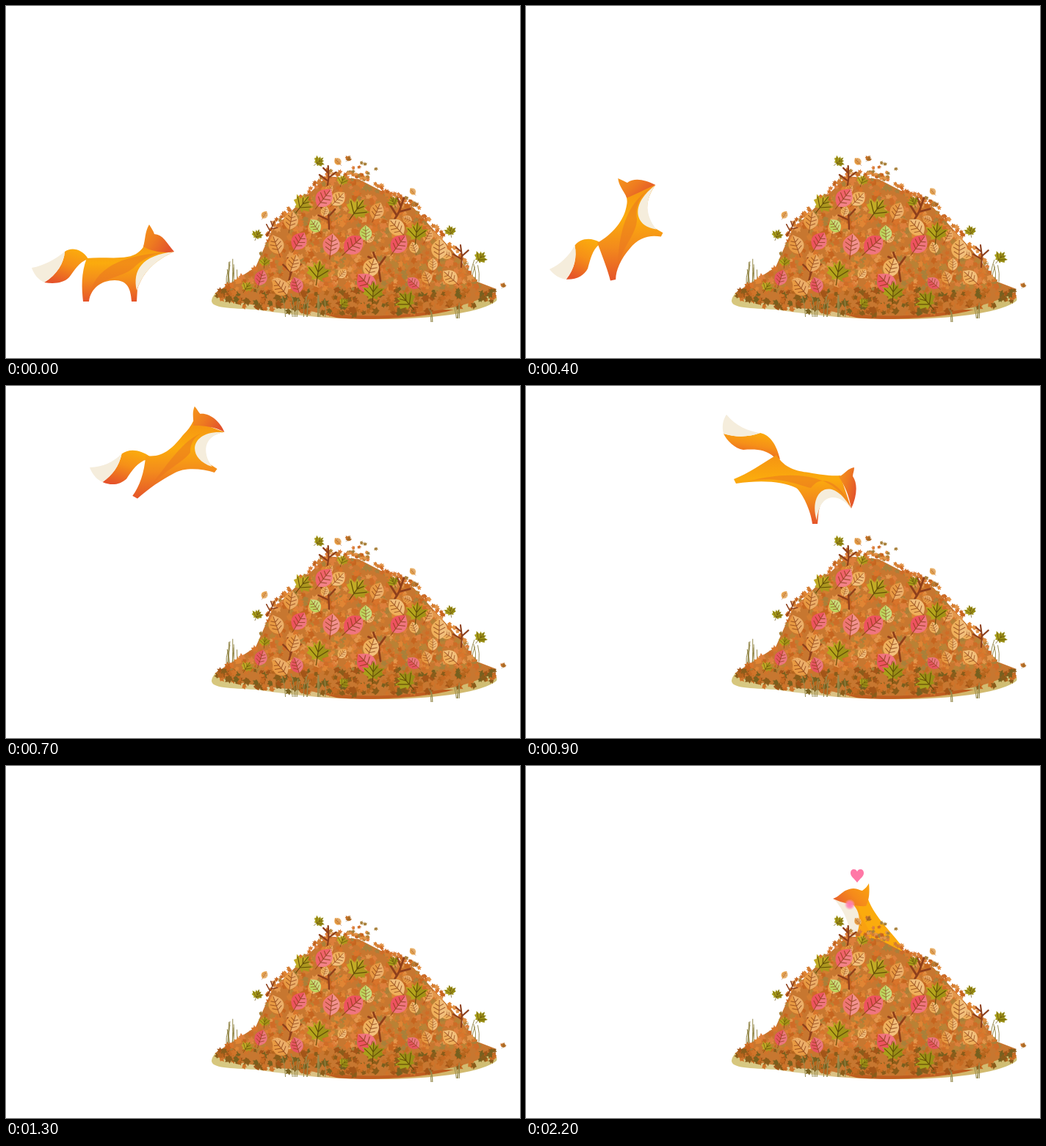
An HTML page that plays this animation: 700 by 480 pixels, repeating every 2800 ms.

```html
<!DOCTYPE html>
<html lang="en">
<head>
<meta charset="utf-8">
<title>Fox and leaf pile</title>
<style>
html, body { margin: 0; width: 100%; height: 100%; overflow: hidden; background: #fff; }
svg { display: block; width: 700px; height: 480px; }
</style>
</head>
<body>
<svg viewBox="0 0 700 480">
  <defs>
    <linearGradient id="coat" x1="0" y1="0" x2="0" y2="1">
      <stop offset="0" stop-color="#f59313"/><stop offset=".35" stop-color="#fbab0d"/>
      <stop offset=".65" stop-color="#f38b1c"/><stop offset="1" stop-color="#e5542a"/>
    </linearGradient>
    <linearGradient id="brush" x1=".7" y1="0" x2=".3" y2="1">
      <stop offset="0" stop-color="#fbab0d"/><stop offset=".45" stop-color="#f69018"/><stop offset="1" stop-color="#e5532a"/>
    </linearGradient>
    <linearGradient id="face" x1="0" y1="0" x2="1" y2=".6">
      <stop offset="0" stop-color="#f6961a"/><stop offset=".5" stop-color="#ee7b20"/><stop offset="1" stop-color="#e3542c"/>
    </linearGradient>
    <linearGradient id="peekFace" x1="1" y1="0" x2="0" y2=".6">
      <stop offset="0" stop-color="#fba50d"/><stop offset=".55" stop-color="#f58a1b"/><stop offset="1" stop-color="#e9652b"/>
    </linearGradient>
    <radialGradient id="blush">
      <stop offset="0" stop-color="#ff78b0"/><stop offset=".55" stop-color="#ff86b4" stop-opacity=".85"/>
      <stop offset="1" stop-color="#ff9cc0" stop-opacity="0"/>
    </radialGradient>
    <linearGradient id="soil">
      <stop offset="0" stop-color="#d6c67c"/><stop offset=".25" stop-color="#ddd09a"/>
      <stop offset=".55" stop-color="#d9a85c"/><stop offset="1" stop-color="#cfc076"/>
    </linearGradient>
    <path id="halfMaple" d="M0-1 .2-.55 .46-.72 .42-.32 .98-.38 .74-.04 .88.2 .4.42 .42.66 0 .5Z"/>
    <g id="maple">
      <use href="#halfMaple" transform="scale(-1 1)"/>
      <use href="#halfMaple"/><use href="#halfMaple" style="fill:#5c4a00;fill-opacity:.2"/>
      <path d="M0-.85V1.05M-.78-.26 0 .42 .78-.26M-.33-.5 0 0 .33-.5" style="fill:none" stroke="#644d08" stroke-width=".07"/>
    </g>
    <g id="oval">
      <path d="M0-1.05C.35-.75.8-.5.76.05 .72.55.3.8 0 .95-.3.8-.72.55-.76.05-.8-.5-.35-.75 0-1.05Z"/>
      <path d="M0-1.05C.35-.75.8-.5.76.05 .72.55.3.8 0 .95Z" style="fill:#fff;fill-opacity:.2"/>
      <path d="M0-.9V1.3M-.4-.55 0-.3 .4-.55M-.57-.22 0 .1 .57-.22M-.5.2 0 .5 .5.2" style="fill:none" stroke="#8a3c14" stroke-opacity=".75" stroke-width=".075"/>
    </g>
    <path id="scrap" d="M0-1 .25-.4 .9-.5 .6.1 .7.5 0 .6-.7.5-.6.1-.9-.5-.25-.4Z"/>
    <path id="twig" d="M0 0 .05-.5 0-1M.04-.35-.35-.6M.05-.5 .35-.75M.02-.7-.2-.9" style="fill:none" stroke="#8e3f1b" stroke-width=".07" stroke-linecap="round"/>
  </defs>
  <g id="fox">
    <path id="tail" fill="url(#brush)"/>
    <path id="tip" fill="#f5eddc"/>
    <path id="body" fill="url(#coat)"/>
    <path id="shade" fill="#ea7420" fill-opacity=".5"/>
    <path id="chest" fill="#f5eddc"/>
    <path id="head" fill="url(#face)"/>
  </g>
  <g id="peek">
    <path fill="#fbab0d" d="M424 184C438 198 445 220 447 265H512V246C498 226 476 208 466 182Z"/>
    <path fill="#f59417" fill-opacity=".45" d="M452 190C456 210 472 225 480 258H455C452 225 448 206 440 190Z"/>
    <path fill="#f5eddc" d="M420 182C432 196 440 212 444 240C456 226 460 196 440 185Z"/>
    <path fill="url(#peekFace)" d="M418 181C428 178 431 168 446 167 452 167 455 170 458 170 462 167 465 164 467 160 468 170 468 182 463 191 450 192 432 187 418 181Z"/>
    <circle id="cheek" cx="441" cy="189" r="7.5" fill="url(#blush)"/>
  </g>
  <g id="pile"></g>
  <g id="flying"></g>
  <path id="heart" fill="#ff78a6" d="M451 159C447 153 442 151 442 146 442 140 449 139 451 144 453 139 460 140 460 146 460 151 455 153 451 159Z"/>
</svg>
<script>
(() => {
const $ = id => document.getElementById(id);
const lerp = (a, b, t) => a + (b - a) * t;

// Standing, leaping and diving fox. All share one path structure, so they blend point by point.
const poses = [
  { at: [150, 360], angle: 0,
    tail: 'M112,345C103,330 88,329 80,335C79,350 70,366 52,377C66,379 78,378 86,370C94,360 98,350 112,345Z',
    tip: 'M80,335C66,346 52,354 35,357C38,366 44,373 52,377C70,366 79,350 80,335Z',
    body: 'M110,344C135,341 165,348 180,336C188,330 188,326 189,322L229,335C203,347 187,362 179,386L178,403L171,403C170,385 165,374 148,374C130,374 115,385 113,403L105,403C103,385 102,364 110,344Z',
    shade: 'M215,336C170,340 125,350 114,392C130,368 160,372 177,354C187,345 200,338 215,336Z',
    chest: 'M229,335C203,347 187,362 178,388C172,360 185,340 229,335Z',
    head: 'M187,328C190,318 189,308 195,298C198,303 201,307 202,311C214,312 218,322 229,335C218,337 200,336 187,328Z' },
  { at: [147, 162], angle: -30,
    tail: 'M133,165C120,161 106,164 99,175C103,192 101,206 92,220C108,222 116,214 120,205C122,192 124,178 132,170Z',
    tip: 'M99,175C93,190 82,202 68,208C75,215 83,220 92,220C101,206 103,192 99,175Z',
    body: 'M128,165C152,160 160,138 165,116C167,108 165,105 164,98L208,95C190,110 190,130 208,145L220,146L219,152C200,156 180,165 167,183C155,198 145,210 136,220L128,218C134,205 136,190 128,165Z',
    shade: 'M204,96C166,105 168,160 148,202C165,170 178,160 181,140C175,120 185,103 204,96Z',
    chest: 'M207,96C191,108 191,130 211,146C172,150 169,112 207,96Z',
    head: 'M166,106C165,100 157,92 157,80C162,83 165,86 168,87C178,80 196,83 208,95C193,94 178,100 166,106Z' },
  { at: [365, 120], angle: 30,
    tail: 'M346,100C341,80 333,67 319,64C303,70 285,70 269,65C274,75 284,85 296,87C312,86 326,86 338,97Z',
    tip: 'M319,64C303,62 285,54 273,39C267,48 267,57 269,65C285,70 303,70 319,64Z',
    body: 'M341,94C352,112 368,116 385,118C402,121 415,123 428,122L443,167C428,145 400,140 398,178L397,188L390,188C388,170 376,145 368,139C350,130 320,128 286,133L283,127C303,119 322,106 341,94Z',
    shade: 'M440,160C415,118 360,115 302,130C345,122 370,135 388,139C402,120 425,130 440,160Z',
    chest: 'M443,167C428,147 400,142 396,183C384,145 415,118 443,167Z',
    head: 'M426,124C434,120 438,112 447,111C447,116 445,119 445,123C452,133 451,150 443,167C440,150 434,135 426,124Z' }
];
const parts = ['tail', 'tip', 'body', 'shade', 'chest', 'head'];
const pair = /(-?[\d.]+),(-?[\d.]+)/g;

// Times are in steps of 100 ms; pose is an index into poses, possibly between two.
const keys = [
  { step: 0, x: 150, y: 360, angle: 0, pose: 0, wag: 0 },
  { step: 1, x: 145, y: 362, angle: 0, pose: 0, wag: 0 },
  { step: 4, x: 126, y: 315, angle: -37, pose: .55, wag: 15 },
  { step: 6, x: 147, y: 162, angle: -30, pose: 1, wag: 0 },
  { step: 7, x: 215, y: 98, angle: -12, pose: 1.35, wag: 0 },
  { step: 9, x: 365, y: 120, angle: 30, pose: 2, wag: 0 },
  { step: 12, x: 450, y: 315, angle: 65, pose: 2, wag: 0 }
];

function turn([x, y], degrees) {
  const a = degrees * Math.PI / 180, c = Math.cos(a), s = Math.sin(a);
  return [x * c - y * s, x * s + y * c];
}

const localPoints = (pose, part) => [...pose[part].matchAll(pair)].map(
  ([, x, y]) => turn([x - pose.at[0], y - pose.at[1]], -pose.angle));

function stateAt(step) {
  const i = Math.max(1, keys.findIndex(k => k.step >= step));
  const a = keys[i - 1], b = keys[i], t = (step - a.step) / (b.step - a.step);
  return Object.fromEntries(Object.keys(a).map(name => [name, lerp(a[name], b[name], t)]));
}

function drawFox({ x, y, angle, pose, wag }) {
  const from = Math.min(1, Math.floor(pose)), blend = pose - from;
  const blended = part => {
    const b = localPoints(poses[from + 1], part);
    return localPoints(poses[from], part).map((p, i) => p.map((v, k) => lerp(v, b[i][k], blend)));
  };
  const root = blended('tail')[0];
  for (const part of parts) {
    const bend = part === 'tail' || part === 'tip' ? wag : 0;
    const points = blended(part).map(p => {
      const [dx, dy] = turn([p[0] - root[0], p[1] - root[1]], bend);
      const [px, py] = turn([root[0] + dx, root[1] + dy], angle);
      return `${(x + px).toFixed(1)},${(y + py).toFixed(1)}`;
    });
    $(part).setAttribute('d', poses[0][part].replace(pair, () => points.shift()));
  }
}

// Seeded random numbers keep the pile the same on every load.
let seed = 71;
function random(low = 0, high = 1) {
  seed = (seed + 0x6D2B79F5) | 0;
  let t = Math.imul(seed ^ seed >>> 15, 1 | seed);
  t ^= t + Math.imul(t ^ t >>> 7, 61 | t);
  return lerp(low, high, ((t ^ t >>> 14) >>> 0) / 4294967296);
}
const pick = list => list[Math.floor(random(0, list.length))];
const leaf = (kind, x, y, size, angle, fill) =>
  `<use href="#${kind}" transform="translate(${x.toFixed(1)} ${y.toFixed(1)}) rotate(${angle.toFixed()}) scale(${size.toFixed(1)})" fill="${fill}"/>`;
const repeat = (count, draw) => Array.from({ length: count }, draw).join('');

const ridge = [[284, 392], [340, 356], [362, 306], [437, 232], [480, 236], [555, 275], [605, 330], [642, 376], [668, 386]];
function ridgeY(x) {
  const i = Math.max(1, ridge.findIndex(p => p[0] >= x));
  const [x0, y0] = ridge[i - 1], [x1, y1] = ridge[i];
  return lerp(y0, y1, (x - x0) / (x1 - x0));
}
const baseY = x => 396 + 24 * Math.sqrt(Math.max(0, 1 - ((x - 475) / 194) ** 2));

const warm = ['#d9752b', '#e08534', '#cf6c27', '#e3964b', '#d47d30', '#c6651f', '#dd7f3c', '#b98235', '#a8803a'];
const earthy = ['#b5651d', '#8a5c1a', '#c66a22', '#77601f', '#d0742a', '#a35518'];
const amber = ['#eca44b', '#e89a43', '#efb05b'];
const rose = ['#f0626a', '#ed5360', '#ef7774'];
const olive = ['#b5a51b', '#a99f1b', '#c1ab25'];

function scrap() {
  const x = random(288, 666), y = random(222, 420);
  if (y < ridgeY(x) || y > baseY(x)) return '';
  return leaf('scrap', x, y, random(3.5, 6.7), random(0, 360), pick(y > 386 ? earthy : warm));
}

function fringe() {
  const x = random(345, 630);
  return leaf('scrap', x, ridgeY(x) - random(2, 9), 3.7, random(0, 360), pick(warm));
}

function amberLeaf() {
  const x = random(360, 600);
  return leaf('oval', x, lerp(ridgeY(x), 400, random(.1, 1)), random(7, 10), random(-70, 70), pick(amber));
}

const bunch = (kind, size, fills, points) => points.map(([x, y]) =>
  leaf(kind, x, y, size * random(.9, 1.1), random(-50, 50), pick(fills))).join('');

function grass(x, y, width, height, count) {
  const blades = repeat(count, () => {
    const h = height * random(.5, 1);
    return `M${x + random(0, width)} ${y}q${random(-2, 2)} ${-h / 2} ${random(-6, 6)} ${-h}`;
  });
  return `<path d="${blades}" fill="none" stroke="#978b4e"/>`;
}

$('pile').innerHTML =
  '<path fill="url(#soil)" d="M280 402C282 386 310 374 350 380H620C650 380 672 390 668 402 650 417 590 426 520 427 440 428 390 421 340 414 305 412 280 412 280 402Z"/>' +
  '<path fill="#bf5d20" d="M420 417C480 411 560 414 610 414 570 426 490 429 450 425Z"/>' +
  grass(300, 380, 18, 36, 9) + grass(622, 376, 24, 34, 8) +
  `<path d="M${ridge.join('L')}Q640 410 560 419T400 414Q320 410 284 392Z" fill="#c77730"/>` +
  repeat(1700, scrap) + repeat(110, fringe) +
  repeat(18, () => leaf('scrap', random(462, 506), random(212, 240), 3.2, random(0, 360), pick(warm))) +
  [[437, 250, 32], [355, 313, 22], [440, 304, 34], [525, 298, 40], [510, 375, 40], [385, 375, 34], [620, 356, 30]]
    .map(([x, y, size]) => leaf('twig', x, y, size, random(-25, 30), 'none')).join('') +
  repeat(14, amberLeaf) +
  bunch('oval', 13, amber, [[388, 293], [368, 326], [391, 351], [452, 263], [505, 280], [532, 302], [497, 357], [590, 332], [605, 370], [374, 384]]) +
  bunch('oval', 6, amber, [[352, 285], [554, 253], [452, 212]]) +
  bunch('oval', 15, rose, [[433, 262], [399, 321], [443, 326], [473, 326], [535, 325], [491, 378]]) +
  bunch('oval', 11, ['#e65560'], [[555, 378], [347, 371], [396, 381]]) +
  bunch('oval', 11, ['#bdd65d'], [[421, 300], [490, 310]]) +
  bunch('maple', 16, olive, [[404, 270], [478, 277], [559, 309], [425, 363], [500, 390], [545, 402]]) +
  bunch('maple', 9, olive, [[426, 212], [458, 238], [527, 267], [342, 312], [605, 307], [646, 343], [352, 349], [460, 405], [328, 383]]) +
  bunch('maple', 5, ['#d87b32'], [[466, 208], [558, 271], [677, 381]]) +
  grass(380, 424, 66, 34, 13) + grass(574, 431, 12, 22, 3) + grass(612, 426, 18, 22, 4);

const tossed = [
  ['oval', 397, 182, '#e8643f'], ['oval', 456, 173, '#e6a03c'], ['maple', 485, 182, olive[0]],
  ['oval', 514, 213, rose[1]], ['oval', 397, 230, '#e94b4f']
];

// Leaves rise and fall on a parabola around the top of their flight.
function drawTossed(age) {
  $('flying').innerHTML = Math.abs(age) > 1 ? '' : tossed.map(([kind, x, y, fill], i) =>
    leaf(kind, lerp(x, 460, .05 * age * age), y + 40 * age * age, 9, 25 * age + 55 * i * (-1) ** i + 20, fill)).join('');
}

const show = (id, on) => $(id).setAttribute('visibility', on ? 'visible' : 'hidden');

function render(step) {
  const happy = step >= 22, sunk = Math.max(0, 19 - step) / 2;
  show('fox', step < 13);
  show('peek', step >= 16);
  show('heart', happy);
  $('cheek').setAttribute('opacity', happy ? 1 : 0);
  $('peek').setAttribute('transform', `translate(${22 * sunk} ${39 * sunk})`);
  if (step < 13) drawFox(stateAt(step));
  drawTossed(step - 17);
}

const start = performance.now();
let shown = -1;
function tick() {
  const step = Math.floor((performance.now() - start) % 2800 / 100);
  if (step !== shown) render(shown = step);
  requestAnimationFrame(tick);
}
tick();
})();
</script>
</body>
</html>
```
